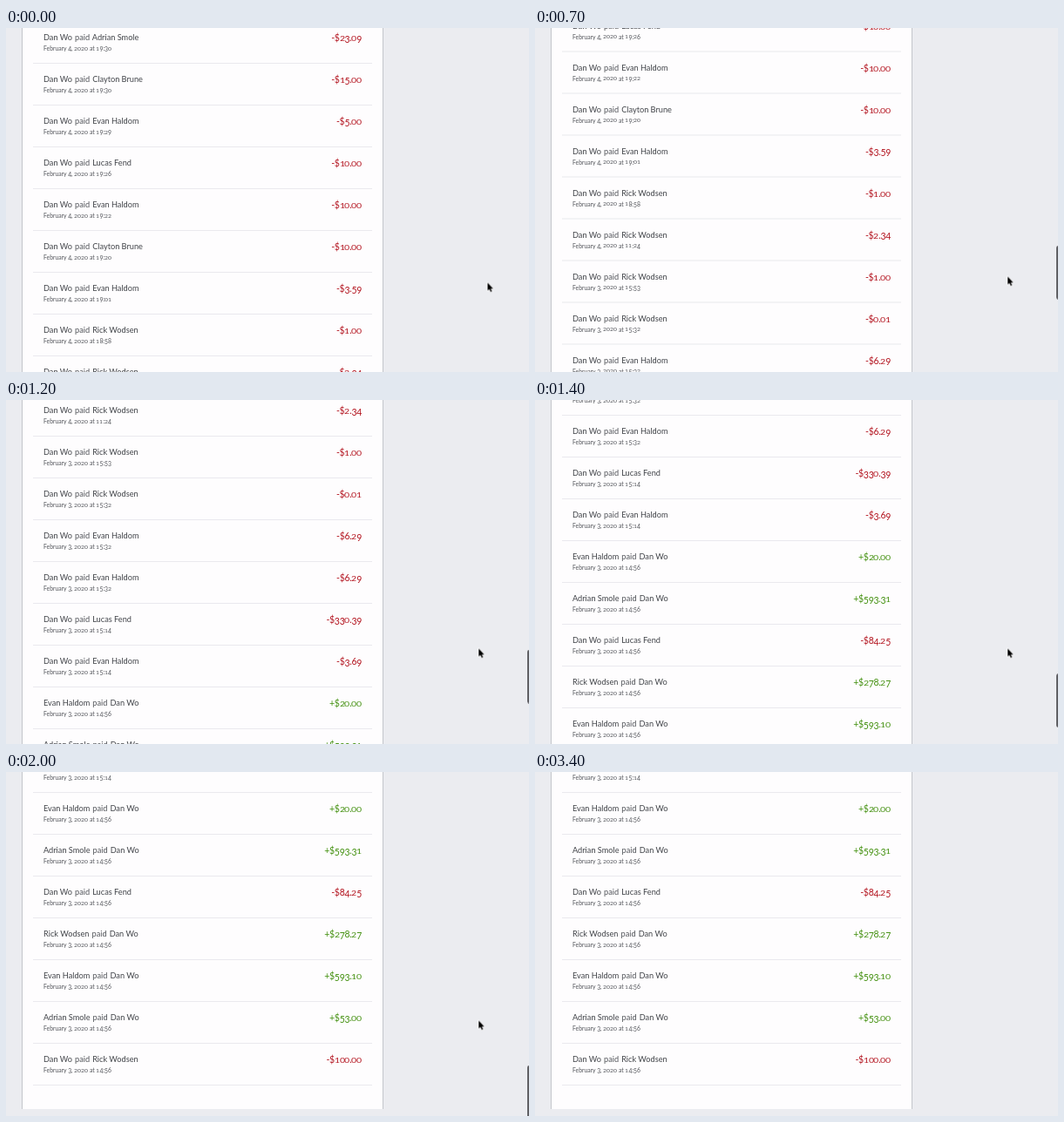
Animation of 600x395 px, one loop 3500 ms. Source, as an HTML page:

```html
<!DOCTYPE html>
<html lang="en">
<head>
<meta charset="utf-8">
<title>Payment history</title>
<style>
  @property --scroll {
    syntax: '<number>';
    inherits: true;
    initial-value: 0;
  }

  html, body {
    margin: 0;
    width: 100%;
    height: 100%;
    overflow: hidden;
    background: #ebecf0;
  }

  .stage {
    position: relative;
    width: 600px;
    height: 395px;
    overflow: hidden;
    font-family: Lato, "Open Sans", sans-serif;
    animation: scroll 3.5s infinite;
  }

  .card {
    position: absolute;
    left: 18px;
    top: -7px;
    width: 413px;
    padding-bottom: 27px;
    background: #fefdfe;
    border: solid #c3c5ca;
    border-width: 0 1px;
    transform: translateY(calc(var(--scroll) * -1px));
  }

  .row {
    position: relative;
    box-sizing: border-box;
    height: 48px;
    margin: 0 12px;
    border-bottom: 1px solid #eae9ee;
    white-space: nowrap;
  }

  .row > * { position: absolute; }

  .title {
    left: 12px;
    top: 11.5px;
    font-size: 9.2px;
    line-height: 12px;
    color: #404348;
  }

  .title i {
    margin: 0 .7px;
    font-style: normal;
    color: #505358;
  }

  .date {
    left: 12px;
    top: 24.5px;
    font-size: 6.8px;
    line-height: 10px;
    color: #505358;
  }

  .amount {
    right: 12px;
    top: 11px;
    font-size: 10.5px;
    line-height: 14px;
    letter-spacing: -.3px;
    color: #b3141f;
  }

  .amount.in { color: #43900f; }

  /* old-style figures: some sit at x-height, some hang below the baseline */
  .low, .hang {
    display: inline-block;
    line-height: 1.2;
  }
  .low { transform: scaleY(.79); transform-origin: 0 82%; }
  .hang { transform: translateY(.15em); }

  .thumb {
    position: absolute;
    left: 598px;
    top: 223.6px;
    width: 7px;
    height: 62px;
    border-radius: 3px;
    background: #606064;
    transform: translateY(calc(var(--scroll) * .1635px));
    animation: thumb 3.5s infinite;
  }

  .cursor {
    position: absolute;
    left: 0;
    top: 0;
    width: 9px;
    height: 13.5px;
    overflow: visible;
    animation: cursor 3.5s infinite;
  }

  @keyframes scroll {
    0%      { --scroll: 0;   animation-timing-function: steps(2); }
    5.714%  { --scroll: 6;   animation-timing-function: steps(1); }
    8.571%  { --scroll: 25;  animation-timing-function: steps(2); }
    14.285% { --scroll: 82;  animation-timing-function: steps(4); }
    25.714% { --scroll: 233; animation-timing-function: steps(3); }
    34.285% { --scroll: 383; animation-timing-function: steps(3); }
    42.857% { --scroll: 635; animation-timing-function: steps(1); }
    45.714% { --scroll: 688; animation-timing-function: steps(1); }
    48.571% { --scroll: 692; animation-timing-function: steps(3); }
    57.142%, 100% { --scroll: 689; }
  }

  @keyframes thumb {
    0%      { opacity: 0; animation-timing-function: steps(1); }
    5.714%  { opacity: 1; animation-timing-function: steps(1); }
    57.142% { opacity: 1; animation-timing-function: steps(4); }
    68.571%, 100% { opacity: 0; }
  }

  @keyframes cursor {
    0%      { transform: translate(552.5px, 292.5px); animation-timing-function: steps(3); }
    8.571%  { transform: translate(542.3px, 285.5px); animation-timing-function: steps(1); }
    74.285% { transform: translate(542.3px, 285.5px); animation-timing-function: steps(4); }
    85.714% { transform: translate(568px, 303px); opacity: 1; animation-timing-function: steps(1); }
    88.571%, 100% { transform: translate(568px, 303px); opacity: 0; }
  }
</style>
</head>
<body>
<div class="stage">
  <div class="card"></div>
  <div class="thumb"></div>
  <svg class="cursor" viewBox="0 0 8 12">
    <path d="M0 0V8L1.8 6.4 3.1 9.4 4.5 8.8 3.2 5.9H5.7Z" fill="#000" stroke="#fff" stroke-width="1.1" paint-order="stroke"/>
  </svg>
</div>
<script>
  const owner = 'Dan Wo';
  const people = {
    A: 'Adrian Smole',
    C: 'Clayton Brune',
    E: 'Evan Haldom',
    L: 'Lucas Fend',
    R: 'Rick Wodsen'
  };

  // person, signed amount, day of February, time
  const payments = `
    A -23.09 4 19:30
    C -15.00 4 19:30
    E -5.00 4 19:29
    L -10.00 4 19:26
    E -10.00 4 19:22
    C -10.00 4 19:20
    E -3.59 4 19:01
    R -1.00 4 18:58
    R -2.34 4 11:24
    R -1.00 3 15:53
    R -0.01 3 15:32
    E -6.29 3 15:32
    E -6.29 3 15:32
    L -330.39 3 15:14
    E -3.69 3 15:14
    E +20.00 3 14:56
    A +593.31 3 14:56
    L -84.25 3 14:56
    R +278.27 3 14:56
    E +593.10 3 14:56
    A +53.00 3 14:56
    R -100.00 3 14:56`;

  const oldStyle = text => text.replace(/[0-579]/g, digit =>
    `<span class="${digit < 3 ? 'low' : 'hang'}">${digit}</span>`);

  const renderRow = line => {
    const [key, amount, day, time] = line.trim().split(' ');
    const incoming = amount[0] === '+';
    const [from, to] = incoming ? [people[key], owner] : [owner, people[key]];
    return `<div class="row">
      <div class="title">${from} <i>paid</i> ${to}</div>
      <div class="date">${oldStyle(`February ${day}, 2020 at ${time}`)}</div>
      <div class="amount ${incoming ? 'in' : ''}">${oldStyle(amount[0] + '$' + amount.slice(1))}</div>
    </div>`;
  };

  document.querySelector('.card').innerHTML =
    payments.trim().split('\n').map(renderRow).join('');
</script>
</body>
</html>
```
